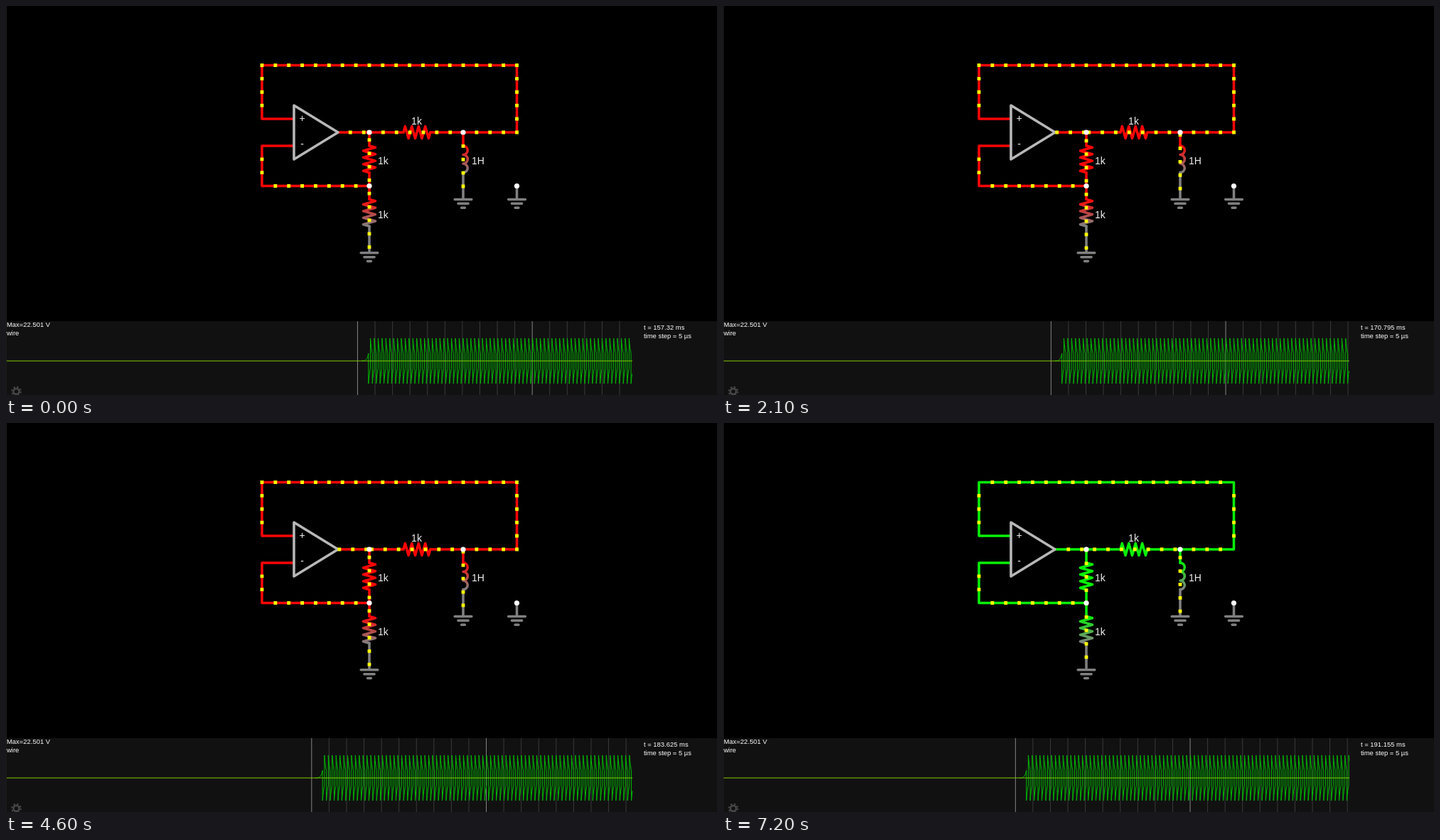
Animation of 1000x548 px, one loop 7400 ms. Source, as an HTML page:

```html
<!DOCTYPE html>
<html lang="en">
<head>
<meta charset="utf-8">
<title>Relaxation oscillator</title>
<style>
  html, body { margin: 0; width: 100%; height: 100%; overflow: hidden; background: #000; }
  svg { display: block; width: 100vw; height: 100vh; font-family: "Liberation Sans", Arial, sans-serif; }
  .line { fill: none; stroke-width: 3.54; stroke-linecap: round; stroke-linejoin: round; }
  .live { stroke: var(--volt); }
  .gray { stroke: #808080; }
  .amp { stroke: #b8b8b8; }
  .hot { stop-color: var(--volt); }
  .label { font-size: 14px; fill: #eee; }
  .info { font-size: 9.43px; fill: #fff; }
</style>
</head>
<body>
<svg id="stage" viewBox="0 0 1000 548">
  <defs>
    <linearGradient id="fadeR" gradientUnits="userSpaceOnUse" x1="0" x2="0" y1="272.4" y2="310.1">
      <stop class="hot"/><stop offset="1" stop-color="#808080"/>
    </linearGradient>
    <linearGradient id="fadeL" gradientUnits="userSpaceOnUse" x1="0" x2="0" y1="196.9" y2="234.6">
      <stop class="hot"/><stop offset="1" stop-color="#808080"/>
    </linearGradient>
  </defs>
  <rect width="1000" height="548"/>
  <g id="circuit"></g>
  <path id="dots" fill="#ff0"/>
  <g id="posts" fill="#fff"></g>
  <g class="label">
    <text x="577.5" y="166.5" text-anchor="middle">1k</text>
    <text x="523" y="223">1k</text>
    <text x="523" y="298.5">1k</text>
    <text x="655" y="223">1H</text>
    <text x="416.5" y="163" text-anchor="middle">+</text>
    <text x="416.5" y="199" text-anchor="middle">-</text>
  </g>
  <rect y="444" width="1000" height="104" fill="#121112"/>
  <path d="M.5,0V548" stroke="#1c1c1c"/>
  <g fill="none" stroke="#484848">
    <circle cx="14.5" cy="543" r="4" stroke-width="2.4"/>
    <circle cx="14.5" cy="543" r="6.2" stroke-width="2" stroke-dasharray="2.43 2.44"/>
  </g>
  <path id="minor" stroke="#3a3a3a"/>
  <path id="major" stroke="#858585"/>
  <path id="wave" fill="none" stroke="#00bc00" stroke-linejoin="bevel"/>
  <path d="M1,500H881" stroke="#84cc00" stroke-width="1.2"/>
  <g class="info">
    <text x="1" y="452">Max=22.501 V</text>
    <text x="1" y="463.5">wire</text>
    <text id="clock" x="897" y="456"></text>
    <text x="897" y="467.5">time step = 5 µs</text>
  </g>
</svg>
<script>
const $ = id => document.getElementById(id);
const LOOP = 7400, FRAMES = 45;
const U = 18.87;                        // circuit grid unit, also the dot spacing
const HALF = 1.105, START = 6.245;      // oscillator half period and first flip, ms
const RIGHT = 881, PX_MS = 2.457, ZERO = 500, PX_V = 1.42;

// Recorded state: step, simulated ms, dot phase in the divider and in the coil
const KEYS = [
  [0, 157.32, 10.7, 0.5],
  [9, 167.965, 11.5, 3.5],
  [17, 173.625, 12.2, 3.8],
  [23, 178.345, 12.2, 3.6],
  [32, 187.845, 10.5, 3.3],
  [36, 190.385, 6.2, 1],
  [44, 191.155, 1, -7.2]
];

function stateAt(step) {
  let i = 0;
  while (i < KEYS.length - 2 && KEYS[i + 1][0] <= step) i++;
  const a = KEYS[i], b = KEYS[i + 1], f = (step - a[0]) / (b[0] - a[0]);
  return a.map((v, j) => v + (b[j] - v) * f);
}

function stepAt(ms) {
  let k = FRAMES - 1;
  while (k && Math.round(k * 18 / 11) * 100 > ms) k--;
  return k;
}

// ---- static circuit
const line = (d, cls, stroke) =>
  `<path class="line ${cls}" d="${d}"${stroke ? ` stroke="url(#${stroke})"` : ''}/>`;

function zigzag(x, y, down) {
  let d = `M${x},${y}`;
  for (let i = 0; i <= 8; i++) {
    const along = 2 * U * (i < 8 ? (2 * i + 1) / 16 : 1);
    const side = i < 8 ? (i % 2 ? -8.5 : 8.5) : 0;
    d += down ? `L${x + side},${y + along}` : `L${x + along},${y - side}`;
  }
  return d;
}

const ground = (x, y) => [11.8, 7.1, 2.4]
  .map((w, i) => `M${x - w},${y + 5.9 * i}h${2 * w}`).join('');
const arc = 'a6.29,6.29 0 0 1 0,12.58';

$('circuit').innerHTML =
  line('M511,310V347.8M643,234.6V272.4M718.5,253.5V272.4'
    + ground(511, 347.8) + ground(643, 272.4) + ground(718.5, 272.4), 'gray') +
  line('M404.5,159H360V83.5H718.5V178H597', 'live') +
  line('M404.5,197H360V253.5H511', 'live') +
  line('M467,178H559M511,178V197M511,234.6V272.4M643,178V197', 'live') +
  line(zigzag(559, 178, false), 'live') +
  line(zigzag(511, 196.9, true), 'live') +
  line(zigzag(511, 272.4, true), '', 'fadeR') +
  line('M643,196.9' + arc + arc + arc, '', 'fadeL') +
  line('M405,140L467,178L405,216Z', 'amp');

$('posts').innerHTML = [[511, 178], [643, 178], [511, 253.5], [718.5, 253.5]]
  .map(([x, y]) => `<circle cx="${x}" cy="${y}" r="3.6"/>`).join('');

// ---- moving parts
const dot = (x, y) => `M${x - 2.4},${y - 2.4}h4.8v4.8h-4.8z`;

function dotRow(x, y, length, phase, down) {
  let d = '';
  for (let s = ((phase % U) + U) % U; s < length - 1; s += U)
    d += down ? dot(x, y + s) : dot(x + s, y);
  return d;
}

function dotPath(divider, coil, negative) {
  let d = dotRow(378.87, 83.5, 330, 0, false)
    + dotRow(360, 102.4, 50, 0, true) + dotRow(718.5, 102.4, 70, 0, true)
    + dotRow(360, 215.8, 30, 0, true) + dotRow(378.87, 253.5, 125, 0, false)
    + dotRow(661.9, 178, 50, 0, false)
    + dotRow(467, 178, 44, divider + coil - 12.8, false)
    + dotRow(511, 178, 132, coil, false)
    + dotRow(511, 178, 169.8, divider, true)
    + dotRow(643, 178, 94.4, coil, true);
  if (negative) d += dot(360, 83.5) + dot(718.5, 83.5) + dot(718.5, 178);
  return d;
}

const half = t => Math.floor((t - START) / HALF);

function scope(now) {
  const at = (t, v) => `${(RIGHT - (now - t) * PX_MS).toFixed(2)},${(ZERO - v * PX_V).toFixed(2)}`;
  const pts = [];
  for (let t = START - 4; t <= START; t += 0.25)
    pts.push(at(t, 7.5 * Math.exp((t - START) / 0.8)));
  for (let n = 0; n <= half(now); n++) {
    for (let j = 0; j <= 4; j++) {
      const dt = HALF * j / 4, t = START + n * HALF + dt;
      if (t <= now) pts.push(at(t, (n % 2 ? 22.5 : -22.5) * Math.exp(-dt)));
    }
  }
  return 'M' + pts.join('L');
}

function gridLines(now) {
  const out = { minor: '', major: '' };
  for (let t = 0; t <= now; t += 10)
    out[t % 100 ? 'minor' : 'major'] += `M${(RIGHT - (now - t) * PX_MS).toFixed(2)},444V548`;
  return out;
}

let shown = -1;
function draw(ms) {
  const step = stepAt(ms % LOOP);
  if (step === shown) return;
  shown = step;
  const [, raw, divider, coil] = stateAt(step);
  const now = Math.round(raw * 200) / 200;
  const negative = half(now) % 2 === 0;
  const grid = gridLines(now);
  $('stage').style.setProperty('--volt', negative ? '#fa0606' : '#08f008');
  $('dots').setAttribute('d', dotPath(divider, coil, negative));
  $('minor').setAttribute('d', grid.minor);
  $('major').setAttribute('d', grid.major);
  $('wave').setAttribute('d', scope(now));
  $('clock').textContent = `t = ${+now.toFixed(3)} ms`;
}

const begin = performance.now();
function tick() {
  draw(performance.now() - begin);
  requestAnimationFrame(tick);
}
tick();
</script>
</body>
</html>
```
